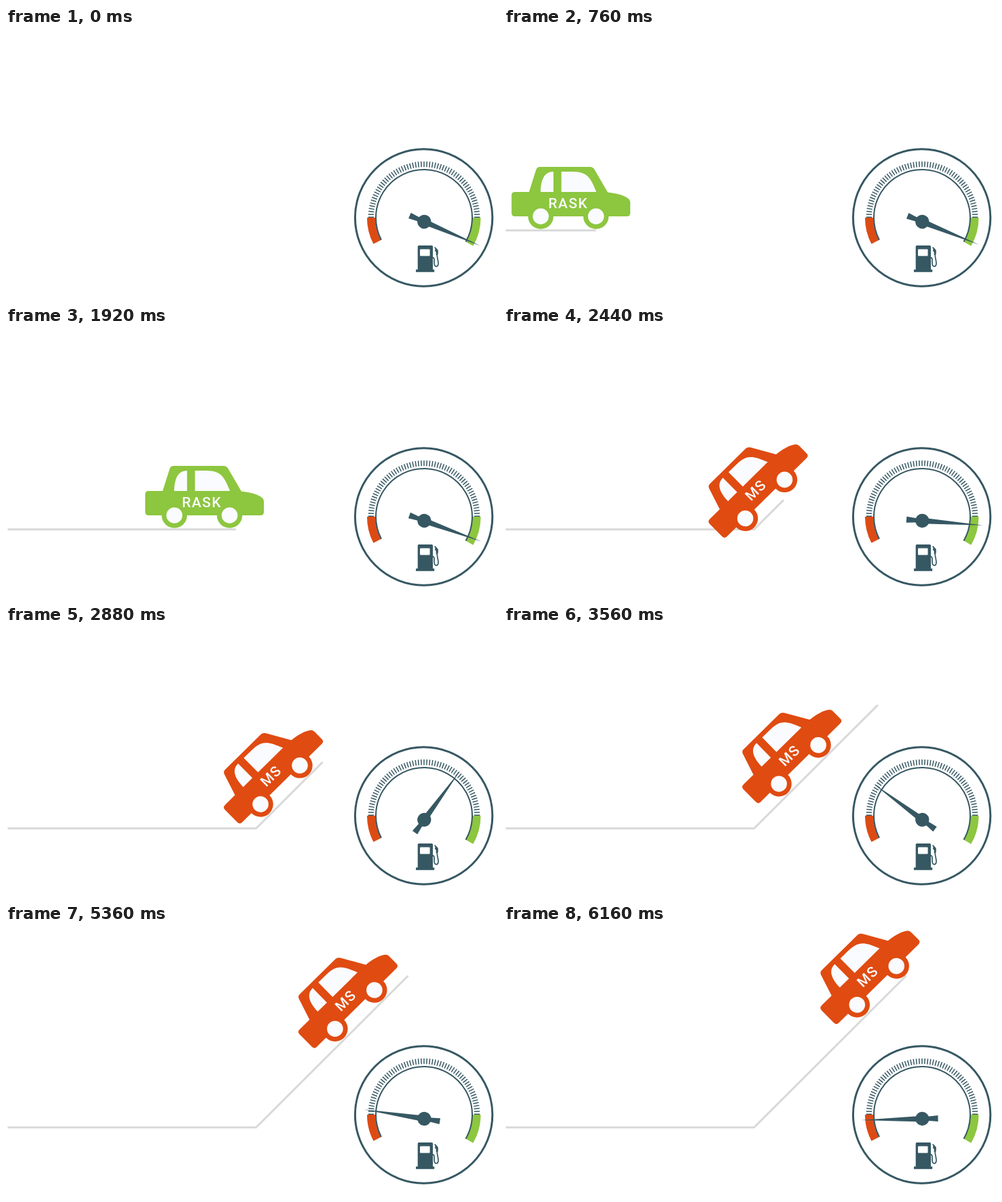
Recreate the animation shown at these times as an HTML page. Size 725 by 400 pixels, loop 6400 ms.

```html
<!DOCTYPE html>
<html lang="en">
<head>
<meta charset="utf-8">
<title>Fuel gauge</title>
<style>
  html, body { margin: 0; width: 100%; height: 100%; overflow: hidden; background: #fff; }
  svg { display: block; width: 100%; height: 100%; }
  text { font: 500 21px Roboto, Arial, sans-serif; letter-spacing: 1.4px; }
</style>
</head>
<body>
<svg viewBox="0 0 725 400">
  <defs><clipPath id="slide"><rect x="2.5" width="722.5" height="400"/></clipPath></defs>

  <path id="road" d="M2.5 298.8H368.5L592.5 75" fill="none" stroke="#d9d9d9" stroke-width="3"/>

  <g clip-path="url(#slide)">
    <!-- The car's origin is midway between the wheel hubs. -->
    <g id="car">
      <path d="M-78.7 -36H-58L-47.5 -69Q-46 -73 -42 -73H32Q36 -73 38.5 -69L58 -35.5C72 -34 81 -31 86.5 -27.5Q91.2 -25 91.2 -20V-5Q91.2 0 86.2 0H-78.7Q-83.7 0 -83.7 -5V-31Q-83.7 -36 -78.7 -36Z"/>
      <circle cx="-40.7" r="18.7"/>
      <circle cx="40.7" r="18.7"/>
      <g fill="#fafbfe">
        <circle cx="-40.7" r="11.8"/>
        <circle cx="40.7" r="11.8"/>
        <path d="M-41 -36C-40.5 -55 -35 -66 -22 -66V-36ZM-10.3 -36V-66H3C25 -66 31 -62 41.3 -36Z"/>
        <text id="label" x="-.3" y="-11.7" text-anchor="middle"></text>
      </g>
    </g>
  </g>

  <g id="gauge" fill="none" stroke="#365863">
    <circle cx="615.6" cy="280" r="101.2" stroke-width="3"/>
    <path id="low" stroke="#dd4b14" stroke-width="12.5"/>
    <path id="full" stroke="#8dc63f" stroke-width="12.5"/>
    <path id="rim" stroke-width="2"/>
    <path id="ticks" stroke-width="1.5"/>
  </g>

  <g fill="#365863">
    <path d="M606.7 322.5Q606.7 321 608.2 321H627.5Q629 321 629 322.5V356.5H631.2V360.2H604V356.5H606.7Z"/>
    <rect x="610" y="326.5" width="14.6" height="10" rx="1" fill="#fff"/>
    <path d="M628 338.5Q631 338.5 631 342V346.5C631 353.5 637 353.5 637 347.5C637 343 635.3 340 635 333" fill="none" stroke="#365863" stroke-width="1.7"/>
    <path d="M631 323.7L632.6 323.2L636.6 327.8Q637.2 330 636.4 335H633.7V331L631.8 328.5L632.6 326.5Z"/>
    <g id="needle">
      <path d="M90 0L8 -4L-10 -3.2L-23.3 -4.5V4.5L-10 3.2L8 4Z"/>
      <circle r="10.2"/>
    </g>
  </g>
</svg>
<script>
const $ = id => document.getElementById(id);
const LOOP = 6400, STEP = 40, END = 6160, CLIMB = 2340;
const road = $('road'), car = $('car'), label = $('label'), needle = $('needle');
const ROAD_LENGTH = road.getTotalLength();

function polar(r, deg, cy = 280) {
  const a = deg * Math.PI / 180;
  return (616 + r * Math.cos(a)).toFixed(2) + ' ' + (cy + r * Math.sin(a)).toFixed(2);
}

function arc(id, r, from, to) {
  const large = to - from > 180 ? 1 : 0;
  $(id).setAttribute('d', `M${polar(r, from)}A${r} ${r} 0 ${large} 1 ${polar(r, to)}`);
}

arc('low', 77.8, 152.5, 180);
arc('full', 77.3, 0, 30);
arc('rim', 71, 152.5, 390);

let marks = '';
for (let a = 180; a <= 360; a += 3) marks += `M${polar(74, a, 279.2)}L${polar(82.3, a, 279.2)}`;
$('ticks').setAttribute('d', marks);

// Needle keys: [time, angle], linear between them
const swing = [[0, 23.2], [2325, 19.4], [3600, -148.8], [4560, -161], [END, -181.3]];

function angleAt(t) {
  let i = 1;
  while (i < swing.length - 1 && t > swing[i][0]) i++;
  const [t0, a0] = swing[i - 1], [t1, a1] = swing[i];
  return a0 + (a1 - a0) * (t - t0) / (t1 - t0);
}

function draw(time) {
  const t = Math.min(Math.floor(time % LOOP / STEP) * STEP, END);
  const drawn = Math.min(t * 0.1752, ROAD_LENGTH);
  const climbing = t >= CLIMB;

  road.setAttribute('stroke-dasharray', `${drawn} 2000`);
  road.setAttribute('visibility', t ? 'visible' : 'hidden');

  car.setAttribute('visibility', t ? 'visible' : 'hidden');
  car.setAttribute('fill', climbing ? '#e04b11' : '#8dc63f');
  label.textContent = climbing ? 'MS' : 'RASK';
  if (climbing) {
    const d = (t - 2880) * 0.0443;
    car.setAttribute('transform', `translate(${404 + d} ${234.5 - d}) rotate(-44.6)`);
  } else {
    car.setAttribute('transform', `translate(${181.8 + (t - 1280) * 0.1672} 278)`);
  }

  needle.setAttribute('transform', `translate(616.3 286) rotate(${angleAt(t)})`);
}

const start = performance.now();
function tick() {
  draw(performance.now() - start);
  requestAnimationFrame(tick);
}
tick();
</script>
</body>
</html>
```
